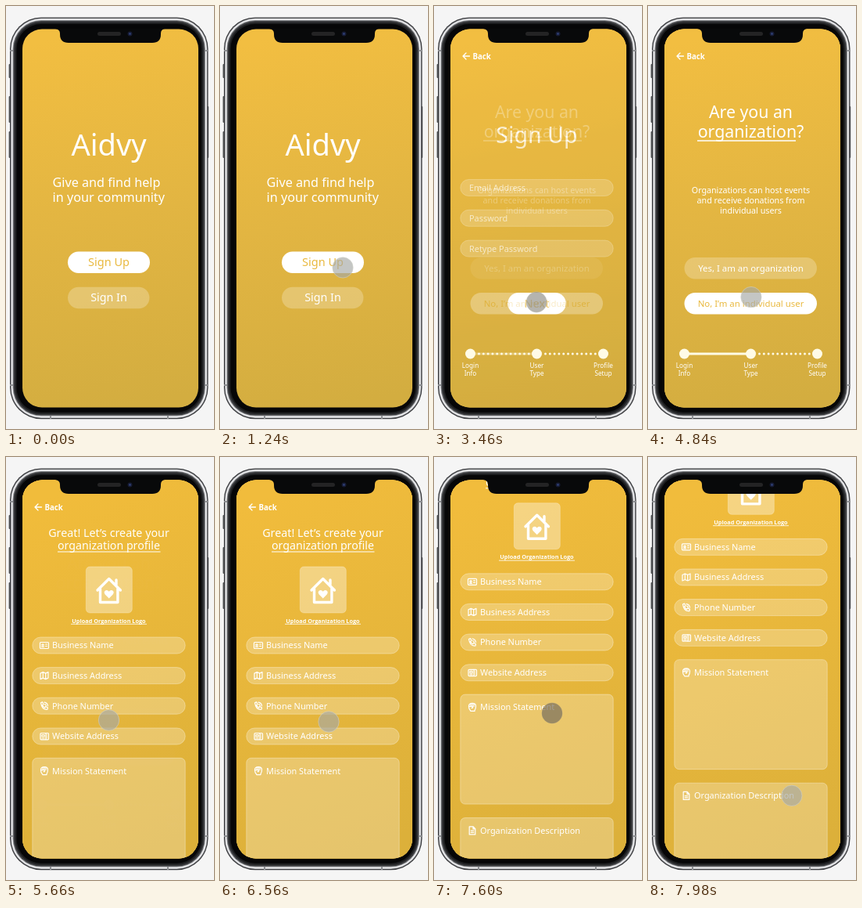
An HTML page for the animation above (8 s loop, 266 by 540 pixels).

```html
<!DOCTYPE html>
<html lang="en">
<head>
<meta charset="utf-8">
<title>Community app sign-up</title>
<style>
  html, body { margin: 0; width: 100%; height: 100%; overflow: hidden; background: #f5f5f5; }
  svg { display: block; width: 100%; height: 100%; }
  text { font-family: "Noto Sans", sans-serif; fill: #fff; }
  .bold { font-family: "Open Sans", sans-serif; font-weight: 700; }
  .gold { fill: #e9b93f; }
  .mid { text-anchor: middle; }
  .field { fill: #fff; fill-opacity: .25; stroke: #fff; stroke-opacity: .42; stroke-width: .8; }
  .line { fill: none; stroke: #fff; stroke-width: 1.2; stroke-linecap: round; stroke-linejoin: round; }
</style>
</head>
<body>
<svg viewBox="0 0 266 540">
  <defs>
    <linearGradient id="amber" x1=".45" y1="0" x2=".55" y2="1">
      <stop offset="0" stop-color="#f2be41"/><stop offset=".5" stop-color="#e2b542"/><stop offset="1" stop-color="#d3ad40"/>
    </linearGradient>
    <linearGradient id="honey" x1=".4" y1="0" x2=".6" y2="1">
      <stop offset="0" stop-color="#f1bc3c"/><stop offset="1" stop-color="#dcb03a"/>
    </linearGradient>
    <clipPath id="screen"><rect x="21" y="29.5" width="225" height="483" rx="25"/></clipPath>
  </defs>

  <rect width="266" height="540" fill="#f5f5f5"/>
  <g fill="#55575a">
    <rect x="3.600" y="74" width="2" height="18" rx="1"/>
    <rect x="3.600" y="115" width="2" height="34" rx="1"/>
    <rect x="3.600" y="160" width="2" height="34" rx="1"/>
    <rect x="257" y="128" width="2.200" height="66" rx="1"/>
  </g>
  <g id="body"></g>
  <path d="M5 57h4M254.500 57h4M5 484h4M254.500 484h4M57 523v4M207 523v4" stroke="#8d8f92" stroke-width="2"/>

  <g clip-path="url(#screen)">
    <g id="home"></g><g id="signup"></g><g id="question"></g><g id="profile"></g>
  </g>

  <path d="M63 29h140q-5 1-5 6v1q0 11-11 11H80q-11 0-11-11v-1q0-5-6-6z" fill="#08090a"/>
  <rect x="117" y="33" width="30" height="5" rx="2.5" fill="#242425"/>
  <circle cx="158.500" cy="35.500" r="3" fill="#171c34"/><circle cx="158.500" cy="35.500" r="1.200" fill="#334681"/>
  <circle id="cursor" r="13.200"/>
</svg>

<script>
const $ = id => document.getElementById(id);

const text = (x, y, size, str, cls = "") =>
  `<text x="${x}" y="${y}" font-size="${size}" class="${cls}">${str}</text>`;
const centered = (y, size, str, cls = "") => text(131.5, y, size, str, "mid " + cls);
const rule = (x1, x2, y, w = 1) =>
  `<path d="M${x1} ${y}H${x2}" stroke="#fff" stroke-width="${w}"/>`;
const backdrop = name =>
  `<rect x="20" y="28" width="228" height="486" fill="url(#${name})"/>`;
const box = (y, h = 21, r = 10.5) =>
  `<rect class="field" x="33.800" y="${y}" width="195.400" height="${h}" rx="${r}"/>`;
const button = (x, y, w, label, size, solid) =>
  `<rect x="${x}" y="${y}" width="${w}" height="27.500" rx="13.750" fill="#fff" opacity="${solid ? 1 : .24}"/>` +
  centered(y + 13.75 + size * .34, size, label, solid ? "gold" : "");
const back = `<path class="line" style="stroke-width:1.300" d="M45.500 64H37M41 60l-4 4 4 4"/>` +
  text(49.5, 67.8, 9.7, "Back", "bold");

// Phone body: nested metal rings, from the outer edge inwards.
$("body").innerHTML = [[0, "#3c3d40"], [1.3, "#b9bbbe"], [2, "#eeeef0"], [3.6, "#8b8d90"], [4.6, "#3a3b3e"], [6.5, "#1e1f21"], [8.5, "#060607"]]
  .map(([inset, color]) => `<rect x="${5 + inset}" y="${14.5 + inset}" width="${253.5 - 2 * inset}"
    height="${512.7 - 2 * inset}" rx="${40 - inset}" fill="${color}"/>`).join("");

// Progress footer: three stops joined by dotted or finished links.
function steps(done) {
  const stops = [["Login", "Info"], ["User", "Type"], ["Profile", "Setup"]];
  return stops.map(([first, second], i) => {
    const x = 46.5 + 85 * i;
    const link = i == 2 ? "" : i < done
      ? `<path d="M${x} 444h85" stroke="#fffbe6" stroke-width="2.800"/>`
      : `<path d="M${x + 11} 444h65" stroke="#fffbe6" stroke-linecap="round" stroke-width="3" stroke-dasharray="0 5.800"/>`;
    return link + `<circle cx="${x}" cy="444" r="6.500" fill="#fffbe6"/>` +
      text(x, 462, 8.2, first, "mid") + text(x, 471.6, 8.2, second, "mid");
  }).join("");
}

// Icons are drawn around their own centre.
const icons = {
  card: `<rect x="-5.500" y="-4" width="11" height="8" rx="1"/><path d="M-3-1.500h2v2h-2zM-3.500 2h3M1.500-1.500h2M1.500 1h2"/>`,
  map: `<path d="M-5-3l3.300-1.500 3.400 1.500L5-4.500V3L1.700 4.500-1.700 3-5 4.500zM-1.700-4.500V3M1.700-3v7.500"/>`,
  phone: `<path d="M-4.500-4l2-1 1.500 3-1.500 1q1 2.500 3 3.300l1.300-1.500 2.700 1.500-.5 2.200q-7 1-8.500-8.500zM0-4.500q4 .5 4.500 4.500M.5-2q1.500.3 1.800 1.800"/>`,
  news: `<rect x="-5" y="-4" width="10.500" height="8.300" rx="1"/><path d="M-3-2h3v2.500h-3zM-3 2.500h3M2-4V4M3.500-2v0M3.500 0v0M3.500 2v0"/>`,
  hand: `<path d="M-4.500-1q0-4 4.500-4t4.500 3.500-1.500 5.500v1h-5l-2-3zM-4-1h4.500v2H-1M-2-4.500V-1M0-4.500V-1M2-4.500V-1"/>`,
  page: `<path d="M-3.800-5h5l2.600 2.700V5h-7.600zM1-5v3h2.800M-1.800.2h3.600M-1.800 2.500h3.600"/>`
};
const entry = (y, icon, label, h, r) => box(y, h, r) +
  `<g class="line" transform="translate(49 ${y + (h ? 16.3 : 10.5)})">${icons[icon]}</g>` +
  text(59, y + (h ? 20.2 : 14.4), 10.9, label);

$("home").innerHTML = backdrop("amber") +
  centered(191, 38, "Aidvy") +
  text(59.5, 230.5, 16.2, "Give and find help") +
  text(59.5, 249.5, 16.2, "in your community") +
  button(79, 313.5, 105, "Sign Up", 14.5, true) +
  button(79, 358.8, 104.5, "Sign In", 14.3);

$("signup").innerHTML = backdrop("amber") + back +
  centered(175, 28.6, "Sign Up") +
  ["Email Address", "Password", "Retype Password"].map((label, i) =>
    box(221.5 + 38.8 * i) + text(45, 236 + 38.8 * i, 10.9, label)).join("") +
  button(94.3, 366, 74.5, "Next", 14.5, true) + steps(0);

$("question").innerHTML = backdrop("amber") + back +
  centered(143, 21.3, "Are you an") +
  centered(168, 21.3, "organization?") + rule(63, 189, 172, 1.3) +
  centered(238.7, 10.7, "Organizations can host events") +
  centered(251.7, 10.7, "and receive donations from") +
  centered(264.7, 10.7, "individual users") +
  button(46.5, 321, 169.5, "Yes, I am an organization", 11.4) +
  button(46.5, 366, 169.5, "No, I’m an individual user", 11.4, true) + steps(1);

$("profile").innerHTML = backdrop("honey") + `<g id="page">` + back +
  centered(101.5, 14.3, "Great! Let’s create your") +
  centered(118, 14.2, "organization profile") + rule(66, 197.5, 121) +
  `<rect x="102.300" y="140" width="59" height="59" rx="5" fill="#fff" fill-opacity=".36" stroke="#fff" stroke-opacity=".25"/>
   <path d="M117 170l14.700-14.500 14.700 14.500M120.500 168v17.500h22.400V168M141 157v6" class="line" style="stroke-width:3.400"/>
   <path d="M131.700 180.500l-5-5q-2.200-3 .3-5 2.700-1.500 4.700 1.300 2-2.800 4.700-1.300 2.500 2 .3 5z" fill="#fff"/>` +
  centered(211.5, 7.3, "Upload Organization Logo", "bold") + rule(83, 180, 213.3, .8) +
  entry(230, "card", "Business Name") +
  entry(268.6, "map", "Business Address") +
  entry(307.2, "phone", "Phone Number") +
  entry(346, "news", "Website Address") +
  entry(384.3, "hand", "Mission Statement", 140, 6) +
  entry(541.8, "page", "Organization Description", 140, 6) + `</g>`;

const LOOP = 8000;
const clamp = v => Math.min(1, Math.max(0, v));
const smooth = p => p * p * (3 - 2 * p);
const drag = p => p ** 1.5;
const glide = p => 1 - (1 - p) ** 1.7;
const ramp = (t, start, length) => clamp((t - start) / length);
const mix = (a, b, p) => a + (b - a) * p;

const path = [ // time, x, y, easing into this point
  [650, 285, 358], [1450, 131, 329], [1750, 131, 329], [2120, 141, 331], [2450, 141, 331],
  [3100, 131, 378], [4740, 132, 378], [5150, 131.5, 336], [6300, 131.5, 336],
  [6560, 139, 338], [6900, 150, 408], [6980, 150, 408], [7600, 151, 327, drag], [8000, 184, 433]
];
const presses = [[1520, 1690], [3200, 3370], [5190, 5360], [6910, 7610]];
const dissolves = [["signup", 1700], ["question", 3340], ["profile", 5340]];

function cursorAt(t) {
  const i = path.findIndex(point => point[0] > t);
  if (i <= 0) return path[0].slice(1, 3);
  const [t0, x0, y0] = path[i - 1], [t1, x1, y1, ease = smooth] = path[i];
  const p = ease(ramp(t, t0, t1 - t0));
  return [mix(x0, x1, p), mix(y0, y1, p)];
}

function render(t) {
  for (const [id, start] of dissolves) $(id).setAttribute("opacity", smooth(ramp(t, start, 340)));

  const scroll = 81 * drag(ramp(t, 6980, 620)) + 44.7 * glide(ramp(t, 7600, 390));
  $("page").setAttribute("transform", `translate(0 ${-scroll})`);

  const [x, y] = cursorAt(t);
  const press = Math.max(...presses.map(([down, up]) => ramp(t, down, 90) * (1 - ramp(t, up, 160))));
  const cursor = $("cursor");
  cursor.setAttribute("transform", `translate(${x} ${y})`);
  cursor.setAttribute("fill", `rgba(${mix(165, 112, press)},${mix(169, 104, press)},${mix(165, 92, press)},.66)`);
  cursor.setAttribute("stroke", `rgba(215,215,205,${mix(.5, .1, press)})`);
}

function frame() {
  render(performance.now() % LOOP);
  requestAnimationFrame(frame);
}
frame();
</script>
</body>
</html>
```
